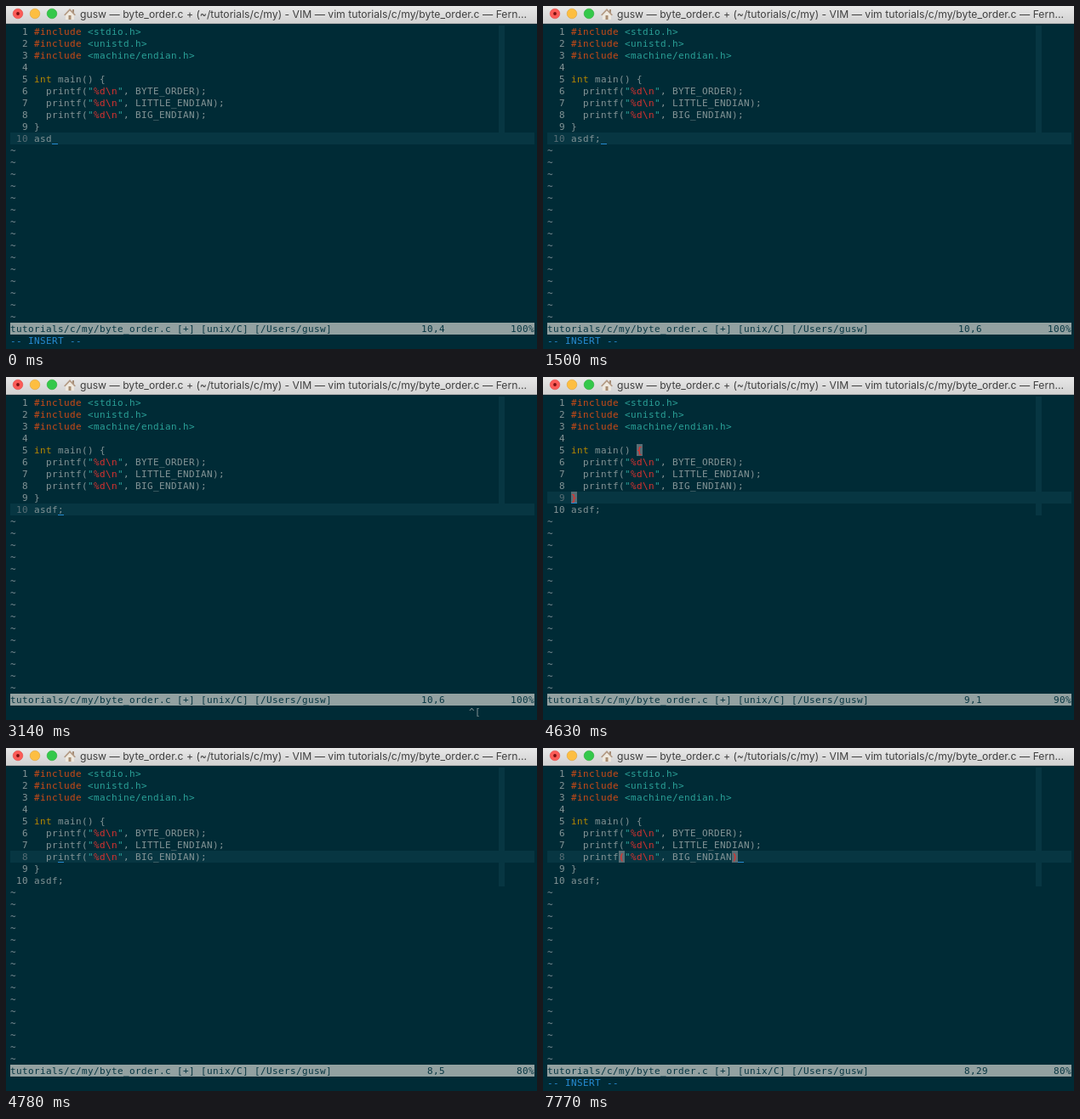
Animation of 624 by 404 pixels, one loop 8 s. Source, as an HTML page with a canvas:

```html
<!DOCTYPE html>
<html lang="en">
<head>
<meta charset="utf-8">
<title>Terminal</title>
<style>
html, body { margin: 0; width: 100%; height: 100%; overflow: hidden; background: #002b36; }
canvas { display: block; }
</style>
</head>
<body>
<canvas id="stage" width="624" height="404"></canvas>
<script>
const ctx = document.getElementById('stage').getContext('2d');

const LOOP = 8000;
const CELL_W = 7, CELL_H = 14, LEFT = 5, TOP = 23, COLS = 88;
const GUTTER = 4;
const STATUS_ROW = 25, COMMAND_ROW = 26;
const MONO = '11px "DejaVu Sans Mono", monospace';
const MONO_BOLD = 'bold ' + MONO;

const C = {
  bg: '#002b36', band: '#073642', dim: '#586e75', tilde: '#657b83',
  text: '#839496', bar: '#93a1a1', yellow: '#b58900', orange: '#cb4b16',
  red: '#dc322f', blue: '#268bd2', cyan: '#2aa198'
};

// Each line is a list of [text, colour] spans.
const include = file => [['#include ', C.orange], [file, C.cyan]];
const print = (name, end = ');') => [
  ['  printf(', C.text], ['"', C.cyan], ['%d\\n', C.red], ['"', C.cyan],
  [', ' + name + end, C.text]
];

function codeLines(s) {
  return [
    include('<stdio.h>'),
    include('<unistd.h>'),
    include('<machine/endian.h>'),
    [],
    [['int', C.yellow], [' main() {', C.text]],
    print('BYTE_ORDER'),
    print('LITTLE_ENDIAN'),
    print('BIG_ENDIAN', s.end),
    [['}', C.text]],
    [[s.last, C.text]]
  ];
}

// Every step changes some fields of the one before it.
const steps = [
  { at: 0, last: 'asd', end: ');', line: 10, col: 4, shown: 4, cursor: true, insert: true, keys: '', match: [] },
  { at: 450, last: 'asdf', col: 5, shown: 5 },
  { at: 1500, last: 'asdf;', col: 6, shown: 6 },
  { at: 3140, col: 5, insert: false, keys: '^[' },
  { at: 4190, shown: 5, keys: '' },
  { at: 4480, cursor: false },
  { at: 4630, line: 9, col: 1, shown: 1, cursor: true, match: [[5, 12, '{'], [9, 1, '}']] },
  { at: 4780, line: 8, col: 5, shown: 5, match: [] },
  { at: 5680, col: 30, shown: 30, insert: true },
  { at: 7770, end: ')', col: 29, shown: 29, match: [[8, 9, '('], [8, 28, ')']] }
];

const stateAt = t => Object.assign({}, ...steps.filter(s => s.at <= t));

const cellX = col => LEFT + col * CELL_W;
const cellY = row => TOP + row * CELL_H;

function fill(x, y, w, h, color) {
  ctx.fillStyle = color;
  ctx.fillRect(x, y, w, h);
}

function fillCells(col, row, w, h, color) {
  fill(cellX(col), cellY(row), w * CELL_W, h * CELL_H, color);
}

function write(text, col, row, color, font = MONO) {
  ctx.font = font;
  ctx.fillStyle = color;
  [...text].forEach((ch, i) => {
    if (ch !== ' ') ctx.fillText(ch, cellX(col + i), cellY(row) + 11);
  });
}

function disc(x, y, r, color, rim) {
  ctx.beginPath();
  ctx.arc(x, y, r, 0, Math.PI * 2);
  ctx.fillStyle = color;
  ctx.fill();
  if (rim) {
    ctx.strokeStyle = rim;
    ctx.lineWidth = 0.6;
    ctx.stroke();
  }
}

function poly(color, ...points) {
  ctx.beginPath();
  points.forEach(([x, y]) => ctx.lineTo(x, y));
  ctx.closePath();
  ctx.fillStyle = color;
  ctx.fill();
}

function drawHouse() {
  fill(78, 4, 2, 4, '#a58d78');
  poly('#eee9df', [70, 10], [75, 5], [80, 10], [80, 16], [70, 16]);
  poly('#b39a84', [68, 10.5], [75, 3], [82, 10.5], [80.5, 11.3], [75, 5.6], [69.5, 11.3]);
  fill(73.5, 11, 3, 5, '#a98e72');
}

function drawTitleBar() {
  const shade = ctx.createLinearGradient(0, 0, 0, 21);
  shade.addColorStop(0, '#e8e8e8');
  shade.addColorStop(1, '#d1d1d1');
  fill(0, 0, 624, 21, shade);
  fill(0, 20, 624, 1, '#b4b4b4');

  disc(14, 9, 5.8, '#fc5b57', '#df4744');
  disc(14, 9, 1.9, '#7a1010');
  disc(34, 9, 5.8, '#fdbe41', '#de9f34');
  disc(54, 9, 5.8, '#34c84a', '#27aa35');
  drawHouse();

  ctx.font = '12.2px Inter, sans-serif';
  ctx.fillStyle = '#404040';
  ctx.fillText('gusw — byte_order.c + (~/tutorials/c/my) - VIM — vim tutorials/c/my/byte_order.c — Fern…', 87, 14);
}

function drawCode(s) {
  fillCells(82, 0, 1, 10, C.band);
  fillCells(0, s.line - 1, COLS, 1, C.band);

  codeLines(s).forEach((spans, row) => {
    const current = row + 1 === s.line;
    write(String(row + 1).padStart(3), 0, row, current ? C.dim : C.text);
    let col = GUTTER;
    for (const [text, color] of spans) {
      write(text, col, row, color);
      col += text.length;
    }
  });
  for (let row = 10; row < STATUS_ROW; row++) write('~', 0, row, C.tilde, MONO_BOLD);

  for (const [line, col, ch] of s.match) {
    fillCells(GUTTER + col - 1, line - 1, 1, 1, C.dim);
    write(ch, GUTTER + col - 1, line - 1, C.red, MONO_BOLD);
  }
  if (s.cursor) {
    fill(cellX(GUTTER + s.col - 1), cellY(s.line) - 1, CELL_W, 1, C.blue);
  }
}

function drawStatus(s) {
  const percent = s.line * 10 + '%';
  fillCells(0, STATUS_ROW, COLS, 1, C.bar);
  write('tutorials/c/my/byte_order.c [+] [unix/C] [/Users/gusw]', 0, STATUS_ROW, C.band);
  write(String(s.line).padStart(2) + ',' + s.shown, 69, STATUS_ROW, C.band);
  write(percent, COLS - percent.length, STATUS_ROW, C.band);

  if (s.insert) write('-- INSERT --', 0, COMMAND_ROW, C.blue);
  write(s.keys, 77, COMMAND_ROW, C.text);
}

function draw(t) {
  const s = stateAt(t);
  fill(0, 0, 624, 404, C.bg);
  drawTitleBar();
  drawCode(s);
  drawStatus(s);
}

const start = performance.now();
function tick() {
  draw((performance.now() - start) % LOOP);
  requestAnimationFrame(tick);
}
tick();
</script>
</body>
</html>
```
